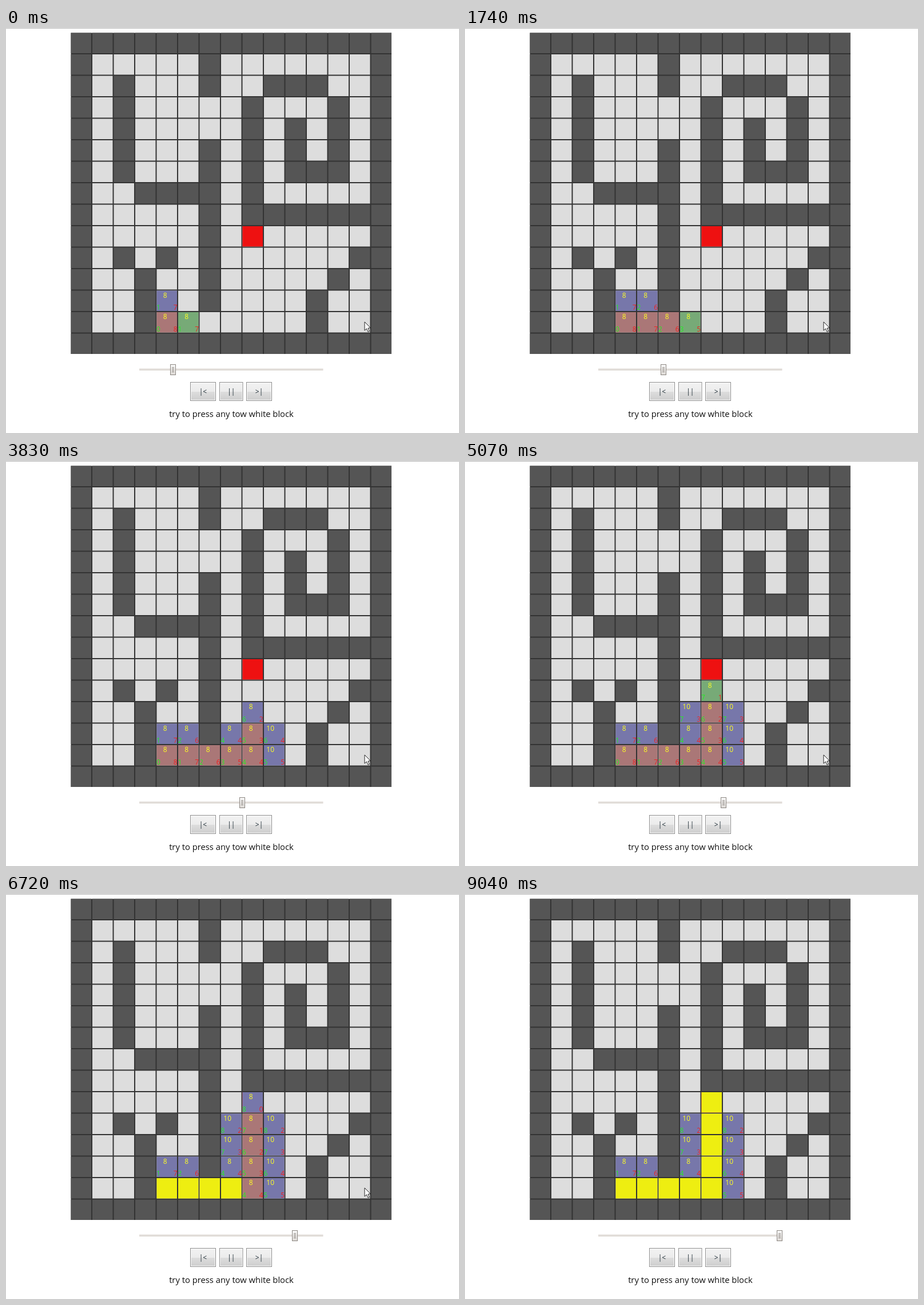
Recreate the animation shown at these times as an HTML page with a canvas. Size 792 by 707 pixels, loop 9300 ms.

```html
<!DOCTYPE html>
<html lang="en">
<head>
<meta charset="utf-8">
<title>Path search</title>
<style>
  html, body { margin: 0; width: 100%; height: 100%; overflow: hidden; background: #fff; }
  canvas { display: block; }
</style>
</head>
<body>
<canvas id="stage" width="792" height="707"></canvas>
<script>
const ctx = document.getElementById('stage').getContext('2d');
const LOOP = 9300, CELL = 37.5, LEFT = 112.5, TOP = 7.5;
const FONT = '"Open Sans", "Noto Sans", sans-serif';

const maze = [
  '###############',
  '#.....#.......#',
  '#.#...#..###..#',
  '#.#.....#...#.#',
  '#.#.....#.#.#.#',
  '#.#...#.#.#.#.#',
  '#.#...#.#.###.#',
  '#..####.#.....#',
  '#.....#.#######',
  '#.....#.......#',
  '#.#.#.#......##',
  '#..#..#.....#.#',
  '#..#..#....#..#',
  '#..#.......#..#',
  '###############'
];

// The found path, the side cells each step opens, and the event at which each step starts
const path = [[4,13], [5,13], [6,13], [7,13], [8,13], [8,12], [8,11], [8,10], [8,9]];
const sides = [[[4,12]], [[5,12]], [], [[7,12]], [[9,13]], [[9,12]],
  [[7,11], [9,11]], [[7,10], [9,10]], []];
const starts = [-5, 0, 4, 8, 12, 16, 20, 25, 30];
const goal = path[8];
const EVENT = 203, LEAD = 30;

const visits = [];
path.forEach((pos, k) => {
  const last = k === path.length - 1;
  visits.push({
    pos, g: k, open: starts[k] - 2,
    pick: last ? Infinity : starts[k],
    close: last ? Infinity : starts[k + 1] - 1,
    trace: 33 + (k - 3) * 1.25
  });
  sides[k].forEach((side, i) => visits.push({
    pos: side, g: k + 1, open: starts[k] + 1 + i,
    pick: Infinity, close: Infinity, trace: Infinity
  }));
});

// Screen refreshes: first time, last time, count
const refreshes = [
  [0, 0, 1], [150, 1080, 8], [1200, 1740, 5], [1860, 2170, 3], [2320, 2590, 3],
  [2720, 3260, 5], [3410, 3830, 4], [3990, 4400, 4], [4520, 5070, 5], [5220, 5460, 3],
  [5610, 6570, 8], [6720, 6720, 1], [6840, 7660, 7], [7780, 8190, 4], [8470, 9040, 5]
];

function refreshTime(t) {
  const [from, to, n] = refreshes.filter(r => r[0] <= t).pop();
  if (n === 1) return from;
  const gap = (to - from) / (n - 1);
  return from + gap * Math.min(n - 1, Math.floor((t - from) / gap + 0.01));
}

function rect(x, y, w, h, fill) {
  ctx.fillStyle = fill;
  ctx.fillRect(x, y, w, h);
}

function text(str, x, y, size, color, align) {
  ctx.font = `${size}px ${FONT}`;
  ctx.fillStyle = color;
  ctx.textAlign = align;
  ctx.fillText(str, x, y);
}

function cell([c, r], fill) {
  rect(LEFT + c * CELL + 1, TOP + r * CELL + 1, CELL - 2, CELL - 2, fill);
}

function shade(y, h, ...colors) {
  const g = ctx.createLinearGradient(0, y, 0, y + h);
  colors.forEach((c, i) => g.addColorStop(i / (colors.length - 1), c));
  return g;
}

function drawVisit(v, event) {
  if (event < v.open) return;
  if (event >= v.trace) return cell(v.pos, '#eeee11');
  cell(v.pos, event >= v.close ? '#aa7777' : event >= v.pick ? '#77aa77' : '#7777aa');
  const x = LEFT + v.pos[0] * CELL, y = TOP + v.pos[1] * CELL;
  const h = Math.abs(v.pos[0] - goal[0]) + Math.abs(v.pos[1] - goal[1]);
  text(v.g + h, x + 19, y + 13, 12, '#ffff22', 'right');
  text(v.g, x + 0.5, y + 34.5, 12, '#22ee22', 'left');
  text(h, x + 37, y + 34.5, 12, '#ee2222', 'right');
}

function drawBoard(t) {
  const event = (t + LEAD) / EVENT;
  rect(LEFT + 1, TOP + 1, 15 * CELL - 2, 15 * CELL - 2, '#333');
  maze.forEach((row, r) => [...row].forEach((ch, c) =>
    cell([c, r], ch === '#' ? '#555' : '#ddd')));
  cell(goal, '#ee1111');
  visits.forEach(v => drawVisit(v, event));
}

function drawSlider(t) {
  rect(233, 594.5, 321.5, 3.5, '#e1dcd8');
  const x = Math.min(545, Math.floor(287 + 0.0317 * t));
  rect(x, 587, 10, 19, '#8c8782');
  rect(x + 1, 588, 8, 17, shade(588, 17, '#fafafa', '#dedad6'));
  for (const y of [592, 594, 596, 598, 600]) {
    if (y % 4 === 0 || y === 594 || y === 598) rect(x + 3, y, 4, 1, '#99948f');
  }
}

function drawButton(x, w, label) {
  rect(x, 618, w, 33, '#8e8e8e');
  rect(x + 1, 619, w - 2, 31, '#fafafa');
  rect(x + 2, 620, w - 4, 15, shade(620, 15, '#f2f2f2', '#ebebeb'));
  rect(x + 2, 635, w - 4, 14, shade(635, 14, '#dddddd', '#cfcfcf'));
  text(label, x + w / 2, 639, 12, '#1c2b33', 'center');
}

function drawCursor(t) {
  if (t >= 9030) return;
  const k = t < 8460 ? 0 : Math.pow((t - 8470 + 142.5) / 570, 1.2);
  ctx.save();
  ctx.translate(627 + 89 * k, 513 + 184 * k);
  ctx.beginPath();
  for (const [x, y] of [[0, 0], [0, 15], [3.4, 11.8], [6, 17.4], [8.4, 16.4], [5.9, 11], [10.4, 10.6]]) {
    ctx.lineTo(x, y);
  }
  ctx.closePath();
  ctx.fillStyle = '#fff';
  ctx.fill();
  ctx.strokeStyle = '#222';
  ctx.lineWidth = 1;
  ctx.stroke();
  ctx.restore();
}

function draw(now) {
  const t = refreshTime(now % LOOP);
  rect(0, 0, 792, 707, '#fff');
  rect(0, 0, 792, 1, '#bbb');
  drawBoard(t);
  drawSlider(t);
  drawButton(322, 45, '|<');
  drawButton(373, 41.5, '||');
  drawButton(420, 45, '>|');
  text('try to press any tow white block', 394, 678.5, 14.8, '#111', 'center');
  drawCursor(t);
}

let begin;
function frame(now) {
  begin ??= now;
  draw(now - begin);
  requestAnimationFrame(frame);
}
requestAnimationFrame(frame);
</script>
</body>
</html>
```
